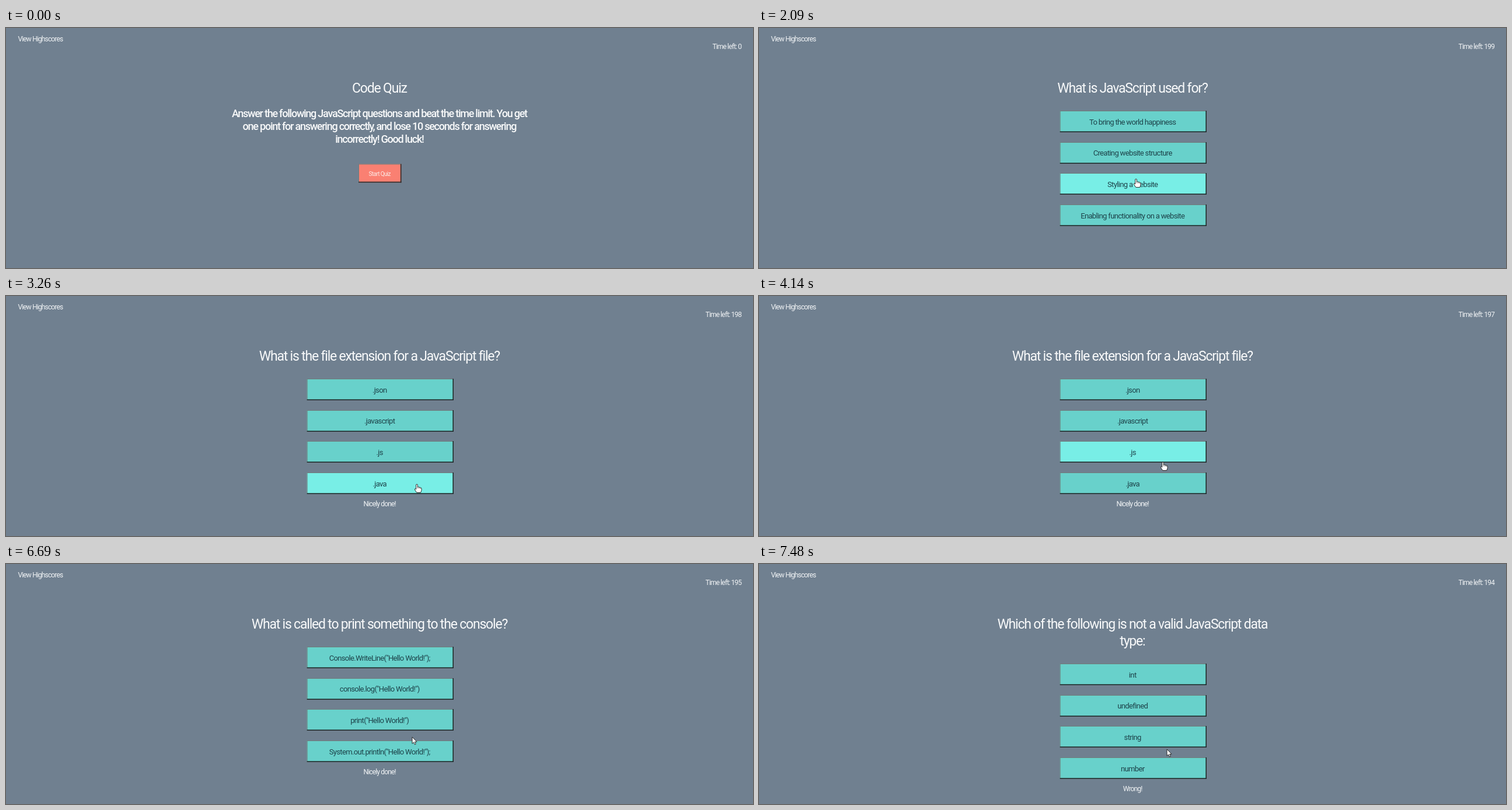
An HTML page with a canvas that plays this animation: 1280 px wide and 412 px high, repeating every 8 s.

```html
<!DOCTYPE html>
<html lang="en">
<head>
<meta charset="utf-8">
<title>Code Quiz</title>
<style>
  html, body { margin: 0; width: 100%; height: 100%; overflow: hidden; background: #708090; }
  canvas { display: block; }
</style>
</head>
<body>
<canvas id="stage" width="1280" height="412"></canvas>
<script>
const ctx = document.getElementById('stage').getContext('2d');
const LOOP = 8000;
const CENTER = 640.5;

// weight, size, letter spacing, colour
const STYLE = {
  title:  [400, 23, -1.2, '#f8f9fa'],
  intro:  [500, 18, -1.25, '#f8f9fa'],
  small:  [400, 12, -0.85, '#f1f3f5'],
  answer: [400, 13, -0.65, '#1d4249'],
  start:  [400, 10, -0.65, '#fbeae7']
};

const INTRO = [
  'Answer the following JavaScript questions and beat the time limit. You get',
  'one point for answering correctly, and lose 10 seconds for answering',
  'incorrectly! Good luck!'
];

const QUESTIONS = [
  { from: 1060, title: ['What is JavaScript used for?'],
    answers: ['To bring the world happiness', 'Creating website structure',
      'Styling a website', 'Enabling functionality on a website'] },
  { from: 3260, title: ['What is the file extension for a JavaScript file?'],
    answers: ['.json', '.javascript', '.js', '.java'], feedback: 'Nicely done!' },
  { from: 4750, title: ['What is called to print something to the console?'],
    answers: ['Console.WriteLine("Hello World!");', 'console.log("Hello World!")',
      'print("Hello World!")', 'System.out.println("Hello World!");'], feedback: 'Nicely done!' },
  { from: 7480, title: ['Which of the following is not a valid JavaScript data', 'type:'],
    answers: ['int', 'undefined', 'string', 'number'], feedback: 'Wrong!' }
];

const TICKS = [2090, 3100, 4050, 5070, 6080, 7080];
const CLICKS = [[990, 1060], [3180, 3260], [4610, 4750], [7350, 7480]];

// Pointer moves: step times and the tip position at each step
const POINTER = [
  [70, 1102, 402], [140, 962, 353], [220, 860, 319], [300, 770, 289],
  [370, 697, 270], [450, 662, 258], [520, 645, 253], [600, 637, 251],
  [2090, 646, 259], [2170, 660, 274], [2250, 681, 294], [2330, 698, 314], [2410, 704, 323],
  [3970, 701, 316], [4050, 696, 301], [4130, 692, 285], [4220, 691, 279],
  [6470, 692, 282], [6540, 694, 287], [6610, 695, 292], [6690, 696, 297],
  [6770, 698, 304], [6850, 699, 310], [6920, 699, 314], [7000, 699, 317], [7080, 699, 318]
];

function text(str, x, y, style, align = 'center') {
  const [weight, size, spacing, color] = STYLE[style];
  ctx.font = `${weight} ${size}px Roboto, sans-serif`;
  ctx.letterSpacing = spacing + 'px';
  ctx.textAlign = align;
  ctx.fillStyle = color;
  const shift = align === 'left' ? 0 : align === 'right' ? spacing : spacing / 2;
  ctx.fillText(str, x + shift, y);
}

function rect(x, y, w, h, color) {
  ctx.fillStyle = color;
  ctx.fillRect(x, y, w, h);
}

// Bevelled box: the dark edge swaps sides while pressed
function bevel(x, y, w, h, face, pressed) {
  const dark = '#202829', soft = '#6f7c7b';
  rect(x, y, w, h, face);
  if (pressed) {
    rect(x + w - 1, y, 1, h, soft);
    rect(x, y + h - 1, w, 1, soft);
    rect(x, y, w, 1.6, dark);
    rect(x, y, 1.6, h, dark);
  } else {
    rect(x, y, w, 1, soft);
    rect(x, y, 1, h, soft);
    rect(x + w - 1.6, y, 1.6, h, dark);
    rect(x, y + h - 1.6, w, 1.6, dark);
  }
}

const inside = (p, x, y, w, h) =>
  !!p && p.x >= x && p.x < x + w && p.y >= y && p.y < y + h;

function drawStart(pointer, pressed) {
  text('Code Quiz', CENTER, 111, 'title');
  INTRO.forEach((line, i) => text(line, CENTER, 153 + 22 * i, 'intro'));
  const box = [604, 233.4, 73.5, 32];
  const hover = inside(pointer, ...box);
  bevel(...box, hover ? '#b84235' : '#fa8072', hover && pressed);
  text('Start Quiz', CENTER, 253.5, 'start');
}

// Returns true when the pointer is over an answer
function drawQuestion(q, pointer, pressed) {
  const drop = 29 * (q.title.length - 1);
  let over = false;
  q.title.forEach((line, i) => text(line, CENTER, 111 + 29 * i, 'title'));
  q.answers.forEach((label, i) => {
    const y = 142 + drop + 53.67 * i;
    const box = [515.6, Math.round(y), 251.4, 37];
    const hover = inside(pointer, ...box);
    over = over || hover;
    bevel(...box, hover ? '#78eee6' : '#68d1cb', hover && pressed);
    text(label, CENTER, y + 23.5, 'answer');
  });
  if (q.feedback) text(q.feedback, CENTER, 360.5 + drop, 'small');
  return over;
}

function drawPointer({ x, y }, hand) {
  const shape = new Path2D(hand
    ? 'M-1.3 .8Q0-.7 1.3 .8V5Q3 4 3.9 5.5Q5.4 4.7 6.2 6.2Q8 5.7 8 7.8V10.5L6.6 14.5H-.2L-3.4 9.8Q-4.2 7.5-2.6 7.8L-1.3 9Z'
    : 'M0 0V11.4L2.6 9L4.4 13L6.3 12.1L4.5 8.3H8Z');
  ctx.save();
  ctx.translate(x, y);
  ctx.fillStyle = '#fff';
  ctx.strokeStyle = '#1a1a1a';
  ctx.lineWidth = 0.9;
  ctx.lineJoin = 'round';
  ctx.fill(shape);
  ctx.stroke(shape);
  if (hand) {
    ctx.lineWidth = 0.6;
    ctx.stroke(new Path2D('M1.3 5V7.5M3.9 5.5V7.8M6.2 6.2V8.2'));
  }
  ctx.restore();
}

function pointerAt(t) {
  const step = POINTER.findLast(([time]) => time <= t);
  return step && { x: step[1], y: step[2] };
}

function render(t) {
  const pointer = pointerAt(t);
  const pressed = CLICKS.some(([down, up]) => t >= down && t < up);
  const question = QUESTIONS.findLast(q => q.from <= t);
  const ticks = TICKS.filter(time => time <= t).length;
  let hand = false;

  rect(0, 0, 1280, 412, '#708090');
  text('View Highscores', 20.5, 23, 'small', 'left');
  text('Time left: ' + (ticks ? 200 - ticks : 0), 1261, 36, 'small', 'right');

  if (question) hand = drawQuestion(question, pointer, pressed);
  else drawStart(pointer, pressed);

  if (!pointer) return;
  if (pressed) {
    ctx.fillStyle = 'rgba(228, 184, 10, .78)';
    ctx.beginPath();
    ctx.arc(pointer.x, pointer.y + 1, 10.3, 0, 2 * Math.PI);
    ctx.fill();
  }
  drawPointer(pointer, hand);
}

function frame() {
  render(performance.now() % LOOP);
  requestAnimationFrame(frame);
}
frame();
</script>
</body>
</html>
```
